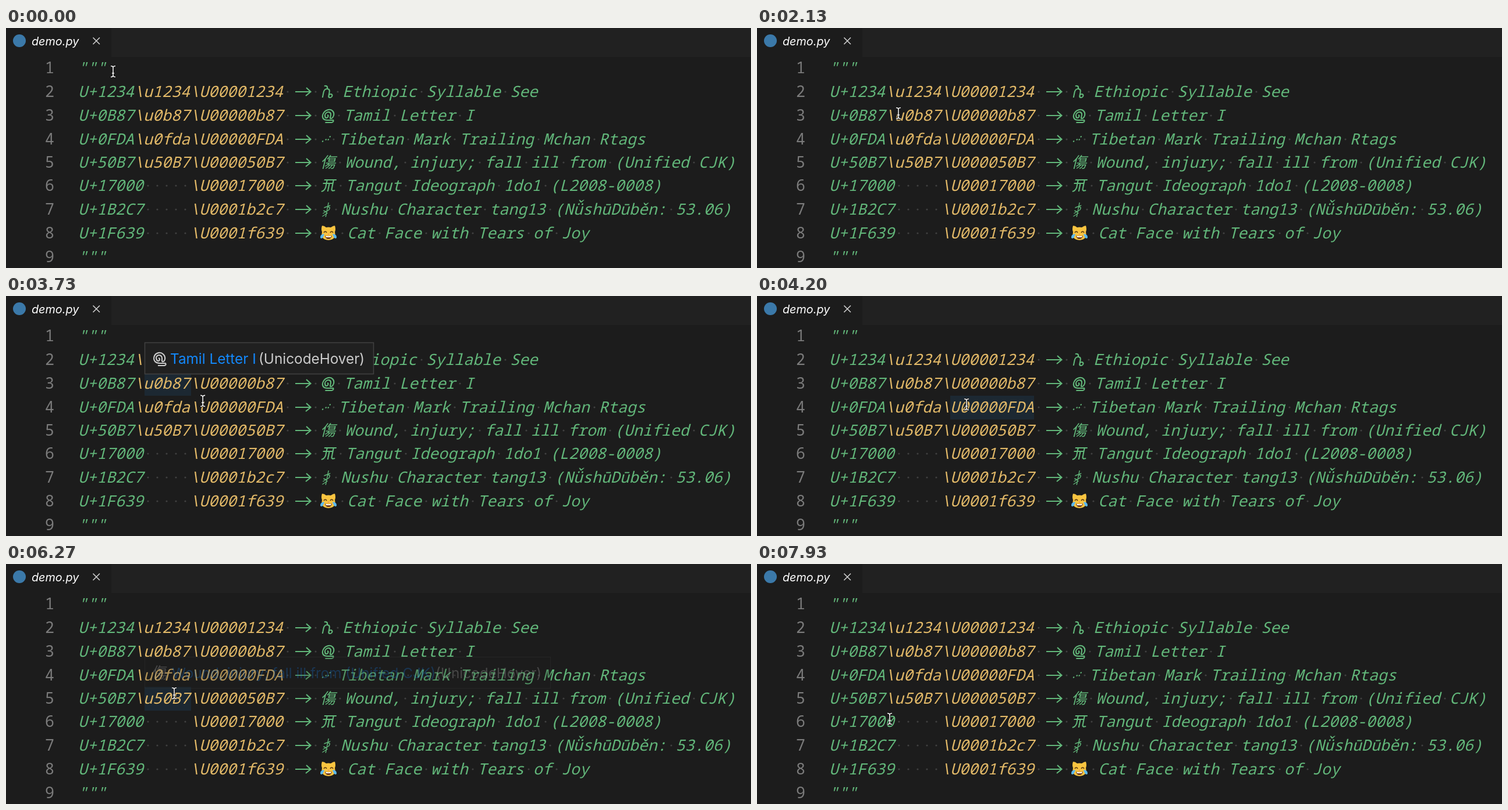
These frames come from a looping animation (1280 by 414 pixels, 8 s). An HTML page with a canvas:

```html
<!DOCTYPE html>
<html lang="en">
<head>
<meta charset="utf-8">
<title>Unicode hover</title>
<style>
html, body { margin: 0; width: 100%; height: 100%; overflow: hidden; background: #1c1c1c; }
canvas { display: block; width: 1280px; height: 414px; }
</style>
</head>
<body>
<canvas id="stage" width="1280" height="414"></canvas>
<script>
const ctx = document.getElementById('stage').getContext('2d');
const LOOP = 8000, FPS = 15;
const CELL = 16, LEFT = 124, GLYPH_X = 540;
const MONO = '26.667px "Noto Sans Mono", "DejaVu Sans Mono", monospace';
const SANS = 'Inter, "Liberation Sans", sans-serif';
const CJK = '26px "Noto Sans CJK SC", "Noto Sans CJK JP", "Noto Sans CJK", sans-serif';
const GREEN = '#62b77a', YELLOW = '#e2b968', GREY = '#cccccc', DOT = '#414141';

// Strokes for scripts without an installed font; y = 0 is the baseline.
const GLYPHS = {
  ethiopic: new Path2D('M4 1V-8Q4 -14 9 -14Q14 -14 14 -8V-2M9 -14V-16Q8 -20 3 -19M14 -2a3 3 0 1 1 3 3q-3 0 -3 -3'),
  tamil: new Path2D('M16 -4V-10A5 5 0 1 0 7 -7a2.5 2.5 0 1 0 3 -3M16 -4Q20 -3 21 -8A9.5 9.5 0 1 0 4 -4Q7 -1 12 -1H22Q24 2 20 3H9'),
  tibetan: new Path2D('M2 -5l2 -1M7 -8l2 -1M11 -8l2 -1M13 -13l2 -1'),
  tangut: new Path2D('M3 -19H24M2 -13H19M8 -19V-6Q7 0 2 1M13 -13V1M19 -19V-3Q19 1 25 -1'),
  nushu: new Path2D('M10 -21V4M10 -13Q16 -14 13 -8L4 -2M4 -12L14 -16M4 -7L9 -5M12 -3L4 3')
};

const ROWS = [
  { y: 78, code: '"""' },
  { y: 119, code: 'U+1234', esc: '\\u1234\\U00001234', glyph: 'ethiopic', x: 578, text: 'Ethiopic Syllable See' },
  { y: 160, code: 'U+0B87', esc: '\\u0b87\\U00000b87', glyph: 'tamil', x: 580, text: 'Tamil Letter I' },
  { y: 201, code: 'U+0FDA', esc: '\\u0fda\\U00000FDA', glyph: 'tibetan', x: 571, text: 'Tibetan Mark Trailing Mchan Rtags' },
  { y: 241, code: 'U+50B7', esc: '\\u50B7\\U000050B7', glyph: '傷', x: 582, text: 'Wound, injury; fall ill from (Unified CJK)' },
  { y: 281, code: 'U+17000     ', esc: '\\U00017000', glyph: 'tangut', x: 583, text: 'Tangut Ideograph 1do1 (L2008-0008)' },
  { y: 322, code: 'U+1B2C7     ', esc: '\\U0001b2c7', glyph: 'nushu', x: 575, text: 'Nushu Character tang13 (NǚshūDūběn: 53.06)' },
  { y: 363, code: 'U+1F639     ', esc: '\\U0001f639', glyph: 'cat', x: 586, text: 'Cat Face with Tears of Joy' },
  { y: 404, code: '"""' }
];

const HOVERS = [
  { from: 700, to: 1800, row: 1, left: 156, cells: 4, right: 643, link: 198, tail: 446 },
  { from: 2480, to: 3790, row: 2, left: 238, cells: 5, right: 632, link: 282, tail: 434 },
  { from: 4200, to: 5630, row: 3, left: 332, cells: 9, right: 968, link: 367, tail: 771 },
  { from: 6235, to: 7600, row: 4, left: 238, cells: 5, right: 936, link: 285, tail: 738 }
];
const FADE = 130;

// Pointer stops: time, x, y
const STOPS = [
  [0, 184, 75], [400, 184, 102], [1600, 184, 102], [2130, 243, 147], [3420, 243, 147],
  [3846, 358, 188], [4100, 360, 187], [5400, 360, 187], [5900, 289, 223],
  [7350, 289, 223], [7900, 228, 267], [LOOP, 228, 267]
];

function write(text, x, y, color, font) {
  ctx.font = font;
  ctx.fillStyle = color;
  ctx.fillText(text, x, y);
}

function disc(x, y, r, color) {
  ctx.fillStyle = color;
  ctx.beginPath();
  ctx.arc(x, y, r, 0, Math.PI * 2);
  ctx.fill();
}

function stroke(path, color, width) {
  ctx.strokeStyle = color;
  ctx.lineWidth = width;
  ctx.stroke(path);
}

function fill(path, color) {
  ctx.fillStyle = color;
  ctx.fill(path);
}

function writeCode(text, x, y, color) {
  write(text, x, y, color, 'italic ' + MONO);
  [...text].forEach((c, i) => {
    if (c === ' ') disc(x + (i + 0.5) * CELL, y - 9, 1.6, DOT);
  });
}

const CAT = {
  head: new Path2D('M3 -22Q7 -22 10 -19Q14 -20 18 -19Q22 -22 25 -22Q27 -16 25 -11Q28 2 14 3Q0 2 3 -11Q1 -16 3 -22Z'),
  eyes: new Path2D('M6 -10Q8.5 -14 11 -10M17 -10Q19.5 -14 22 -10'),
  mouth: new Path2D('M8 -5Q14 -3 20 -5Q19 1 14 1Q9 1 8 -5Z'),
  teeth: new Path2D('M9 -4.5Q14 -3 19 -4.5L18 -2H10Z'),
  tears: new Path2D('M7 -8Q-1 -7 0 -1Q4 3 7 -8ZM21 -8Q29 -7 28 -1Q24 3 21 -8Z'),
  nose: new Path2D('M12.5 -8H15.5L14 -6Z')
};

function drawCat() {
  fill(CAT.head, '#f9c440');
  stroke(CAT.eyes, '#5b3b12', 1.7);
  fill(CAT.mouth, '#6b3a1c');
  fill(CAT.teeth, '#ffffff');
  fill(CAT.tears, '#5bb9f0');
  fill(CAT.nose, '#d98275');
}

function drawGlyph(name, x, y, color, italic) {
  if (name === '傷') {
    write(name, x, y, color, (italic ? 'italic ' : '') + CJK);
    return;
  }
  ctx.save();
  ctx.translate(x, y);
  if (name === 'cat') {
    drawCat();
  } else {
    if (italic) ctx.transform(1, 0, -0.2, 1, 0, 0);
    stroke(GLYPHS[name], color, name === 'nushu' ? 1.4 : 2.1);
  }
  ctx.restore();
}

function drawTabs() {
  ctx.fillStyle = '#212121';
  ctx.fillRect(181, 0, 1099, 50);
  disc(23, 22, 11, '#3b79a9');
  write('demo.py', 44, 30, '#ffffff', 'italic 19.8px ' + SANS);
  stroke(new Path2D('M149.5 16.5L161 28M161 16.5L149.5 28'), '#d0d0d0', 1.6);
}

function drawRow({ y, code, esc, glyph, x, text }, i) {
  write(String(i + 1), 67, y, '#7b7b7b', MONO);
  writeCode(code, LEFT, y, GREEN);
  if (!esc) return;
  const middle = y - 9;
  writeCode(esc, LEFT + code.length * CELL, y, YELLOW);
  [484, 532, x - 8].forEach(dotX => disc(dotX, middle, 1.6, DOT));
  stroke(new Path2D(`M497 ${middle}H523M516 ${middle - 7}L523.5 ${middle}L515 ${middle + 7}`), GREEN, 2.1);
  drawGlyph(glyph, GLYPH_X, y, GREEN, true);
  writeCode(text, x, y, GREEN);
}

function drawHighlight({ left, row, cells }) {
  ctx.fillStyle = '#1c2832';
  ctx.fillRect(left, ROWS[row].y - 29, cells * CELL, 41);
}

function drawTooltip(h, t) {
  const { glyph, text } = ROWS[h.row];
  const top = h.row * 40, y = top + 37;
  const width = h.right - h.left;
  const font = '24.3px ' + SANS;
  ctx.globalAlpha = Math.min(1, (t - h.from) / FADE);
  ctx.fillStyle = '#202020';
  ctx.fillRect(h.left, top, width, 55);
  ctx.strokeStyle = '#414141';
  ctx.lineWidth = 1.5;
  ctx.strokeRect(h.left + 0.5, top + 0.5, width - 1, 54);
  drawGlyph(glyph, h.left + 14, y, GREY, false);
  write(text, h.link, y, '#1389fd', font);
  write('(UnicodeHover)', h.tail, y, GREY, font);
  ctx.globalAlpha = 1;
}

function pointerAt(t) {
  const n = STOPS.findIndex(s => s[0] > t);
  const [t0, x0, y0] = STOPS[n - 1], [t1, x1, y1] = STOPS[n];
  const u = (t - t0) / (t1 - t0), k = u * u * (3 - 2 * u);
  return [x0 + (x1 - x0) * k, y0 + (y1 - y0) * k];
}

const BEAM = new Path2D('M-4 -9.5Q0 -9.5 0 -6.5Q0 -9.5 4 -9.5M0 -7V7M-4 9.5Q0 9.5 0 6.5Q0 9.5 4 9.5M-2 3H2');

function drawPointer(t) {
  ctx.save();
  ctx.translate(...pointerAt(t));
  stroke(BEAM, '#111111', 3.6);
  stroke(BEAM, '#f2f2f2', 1.6);
  ctx.restore();
}

function draw(t) {
  ctx.fillStyle = '#1c1c1c';
  ctx.fillRect(0, 0, 1280, 414);
  const hover = HOVERS.find(h => t >= h.from && t < h.to);
  if (hover) drawHighlight(hover);
  drawTabs();
  ROWS.forEach(drawRow);
  if (hover) drawTooltip(hover, t);
  drawPointer(t);
}

function tick() {
  const t = performance.now() % LOOP;
  // Each picture holds for a fifteenth of a second.
  const step = Math.floor((t + 5) * FPS / 1000) % (LOOP * FPS / 1000);
  draw(step * 1000 / FPS);
  requestAnimationFrame(tick);
}
tick();
</script>
</body>
</html>
```
